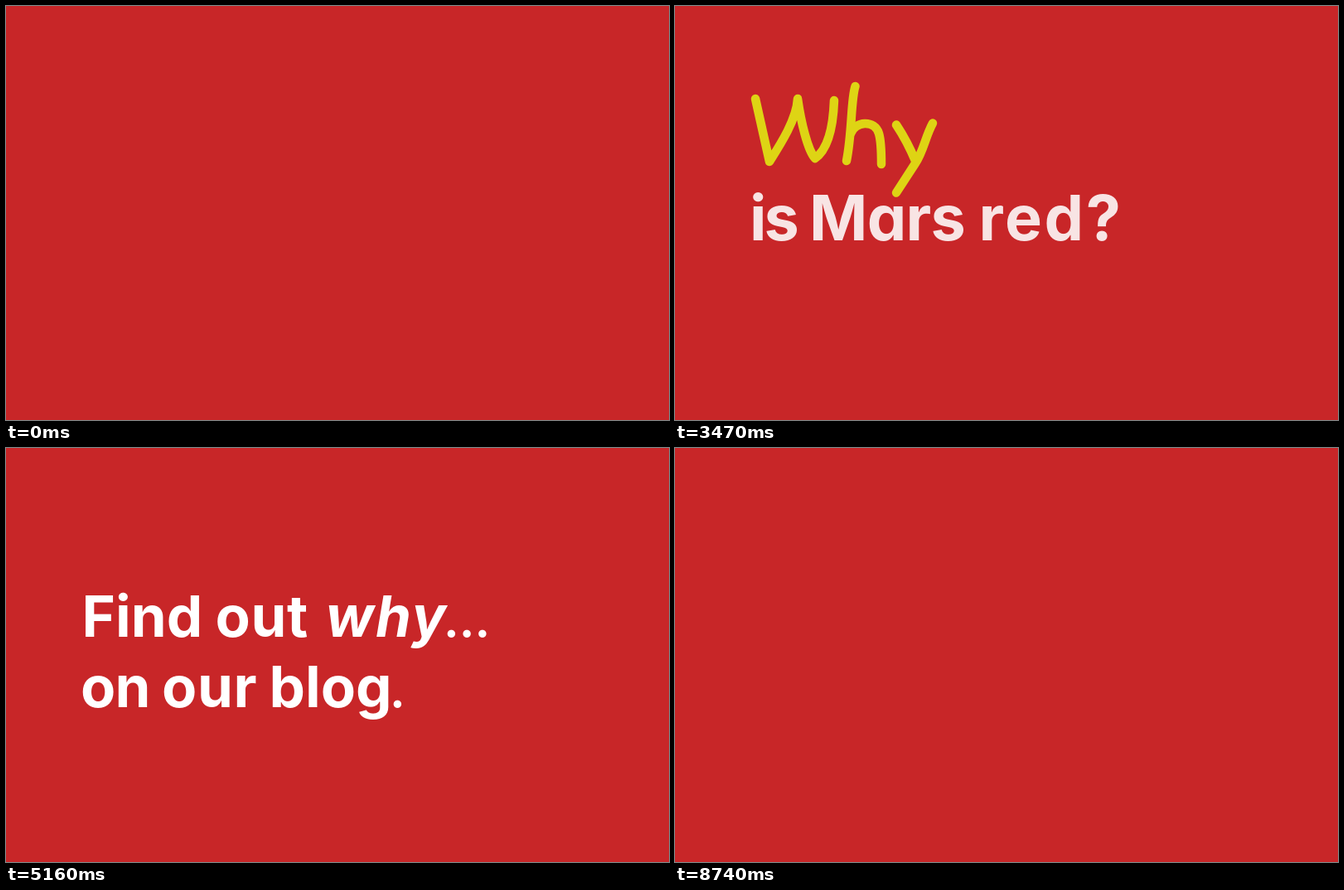
Write an HTML page that moves like this. It is 800 px wide and 500 px high and loops after 8.94 s.

```html
<!DOCTYPE html>
<html lang="en">
<head>
<meta charset="utf-8">
<title>Why is Mars red?</title>
<style>
  html, body { margin: 0; width: 100%; height: 100%; overflow: hidden; background: #c82628; }
  svg { display: block; width: 800px; height: 500px; }
  text { fill: #fff; font-family: Inter, Lato, sans-serif; font-weight: 700; font-feature-settings: "cv11"; white-space: pre; }
  .pen { fill: none; stroke: #e2ec12; stroke-width: 10.5; stroke-linecap: round; stroke-linejoin: round; }
  .fine { stroke-width: 4.5; }
  .line { font-size: 69px; }
  .dots { font-size: 56px; }
  .tight { letter-spacing: -.7px; }
  .loose { letter-spacing: .6px; }
  .wide { letter-spacing: 2.6px; }
  .sign text { font-family: Lato, sans-serif; }
</style>
</head>
<body>
<svg viewBox="0 0 800 500">
  <rect width="800" height="500" fill="#c82628"/>
  <g id="question">
    <g id="why" class="pen"></g>
    <text id="mars" y="282.5" font-size="75.5"><tspan x="90" letter-spacing="-3">is</tspan><tspan x="162" class="tight">Mars</tspan><tspan x="366.5" class="wide">red?</tspan></text>
  </g>
  <g id="answer">
    <g id="find" class="line">
      <text x="91.5" y="228">Find <tspan x="252.500" class="loose">out</tspan></text>
      <text x="385.500" y="228" font-style="italic" letter-spacing="1.8">why</text>
      <text x="528" y="228" class="dots">...</text>
    </g>
    <text id="blog" class="line" y="313"><tspan x="90" class="tight">on</tspan><tspan x="188" class="loose">our</tspan><tspan x="317.500">blog</tspan><tspan x="463" class="dots">.</tspan></text>
  </g>
  <g id="closing">
    <text y="252" font-size="42.5"><tspan x="104" class="loose">NEVER</tspan><tspan x="258.500" class="loose">STOP</tspan><tspan x="384" class="tight">ASKING</tspan></text>
    <g id="smallWhy" class="pen" transform="translate(536.4 167.4) scale(.45)"></g>
    <g class="pen fine">
      <path d="M568 213Q562 216 563 223M575 213Q569 216 570 223"/>
      <path d="M684 220C686 211 703 210 703 221C703 231 689 230 690 240M691 250h.1"/>
      <path d="M711 213Q714 217 710 223M720 213Q723 217 719 223"/>
    </g>
    <circle cx="238" cy="361" r="15" fill="#fff"/>
    <text x="262" y="371.5" font-size="29" letter-spacing=".8">#sayhow</text>
    <g class="sign">
      <rect x="478" y="321" width="14" height="14" fill="#fff"/>
      <text x="427" y="356" font-size="21.5" style="font-weight:400">TINKERER'S</text>
      <text x="426" y="383" font-size="24" letter-spacing=".8" style="font-weight:900">MUSEUM</text>
      <text x="427" y="399.5" font-size="9" letter-spacing="3.6" style="font-weight:400">VELLANDORRIA</text>
    </g>
  </g>
</svg>
<script>
const LOOP = 8940, STEP = 30;
const $ = id => document.getElementById(id);
const clamp = v => Math.min(1, Math.max(0, v));

const strokes = [
  "M97 112L114 188C128 166 147 136 148 112C152 140 160 174 169 184C186 172 191 142 192 114",
  "M217.5 97C212 114 214 152 207 187",
  "M212 154C217 139 241 137 246 154Q249 164 249 191",
  "M267 143.5Q280 163 290 187",
  "M311 141.5C302 158 300 175 290 190L267 225.5"
];

function addStrokes(parent) {
  return strokes.map(d => {
    const path = document.createElementNS("http://www.w3.org/2000/svg", "path");
    path.setAttribute("d", d);
    parent.append(path);
    return path;
  });
}

const penPaths = addStrokes($("why"));
const lengths = penPaths.map(p => p.getTotalLength());
const totalLength = lengths.reduce((a, b) => a + b);
addStrokes($("smallWhy"));

// Time held in 30 ms steps counted from a phase's start.
const stepped = (t, start) => start + Math.floor((t - start) / STEP) * STEP;

function write(progress) {
  let left = progress * totalLength;
  penPaths.forEach((path, i) => {
    const drawn = Math.min(lengths[i], Math.max(0, left));
    path.style.display = drawn > 0 ? "" : "none";
    path.setAttribute("stroke-dasharray", drawn < lengths[i] ? `${drawn} 999` : "none");
    left -= lengths[i];
  });
}

function slide(id, t, start, end, pxPerStep) {
  const remaining = Math.max(0, end - stepped(t, start)) / STEP;
  $(id).style.display = t >= start ? "" : "none";
  $(id).setAttribute("transform", `translate(${-remaining * pxPerStep} 0)`);
}

function fadeOut(t, start) {
  return t < start ? 1 : 0.88 * (1 - clamp((stepped(t, start) - start) / 150));
}

function show(id, opacity) {
  $(id).style.display = opacity > 0 ? "" : "none";
  $(id).setAttribute("opacity", opacity);
}

function render(t) {
  write(clamp((stepped(t, 150) - 120) / 480));
  slide("mars", t, 690, 1170, 32.2);
  show("question", fadeOut(t, 3470));

  slide("find", t, 3840, 4380, 31.3);
  slide("blog", t, 4770, 5160, 34.6);
  show("answer", t < 3840 ? 0 : fadeOut(t, 6660));

  show("closing", t < 8740 ? clamp((stepped(t, 6880) - 6850) / 120) : 0);
}

const begin = performance.now();
function tick() {
  render((performance.now() - begin) % LOOP);
  requestAnimationFrame(tick);
}
tick();
</script>
</body>
</html>
```
